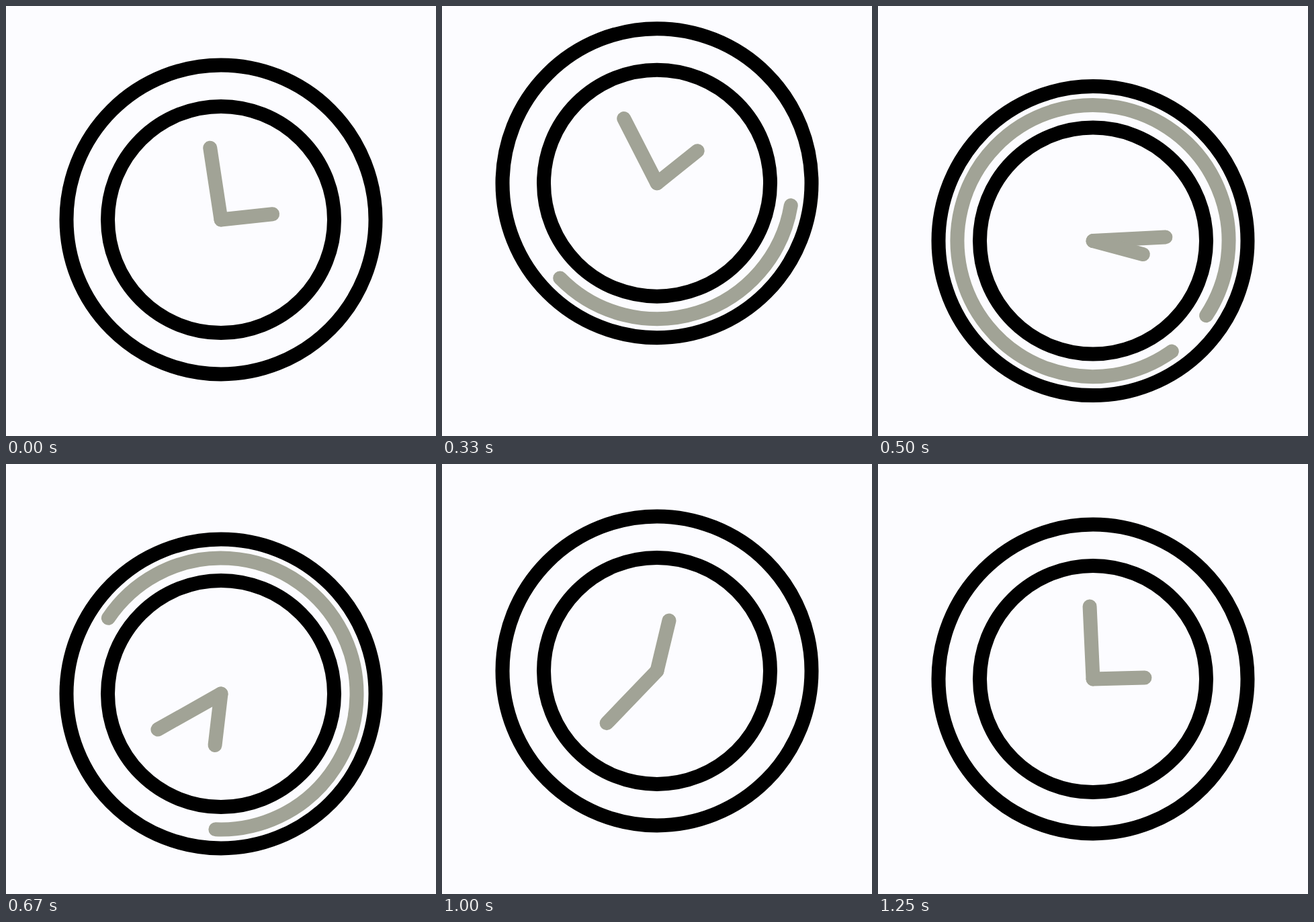
Recreate the animation shown at these times as an HTML page. Size 640 px wide and 640 px high, loop 1.33 s.

```html
<!DOCTYPE html>
<html lang="en">
<head>
<meta charset="utf-8">
<title>Bouncing clock</title>
<style>
  html, body { margin: 0; width: 100%; height: 100%; overflow: hidden; background: #fcfcff; }
  svg { display: block; width: 100%; height: 100%; }
  .line { fill: none; stroke-width: 21; stroke-linecap: round; }
  .ring { stroke: #000; }
  .accent { stroke: #a1a396; }
</style>
</head>
<body>
<svg viewBox="0 0 640 640">
  <g id="clock">
    <circle class="line ring" r="230"/>
    <circle class="line ring" r="168.5"/>
    <path class="line accent" id="sweep"/>
    <path class="line accent" id="minute" d="M0 0V-108"/>
    <path class="line accent" id="hour" d="M0 0H77"/>
  </g>
</svg>
<script>
const LOOP = 1330, FPS = 12, RADIUS = 202;
const el = id => document.getElementById(id);
const clock = el('clock'), sweep = el('sweep'), minute = el('minute'), hour = el('hour');

// Eased curve through [step, value] keys: it rests at turning points and at both ends.
function ease(...keys) {
  const last = keys.length - 1;
  const slope = i => {
    if (i === 0 || i === last) return 0;
    const [a, k, b] = keys.slice(i - 1, i + 2);
    const turns = (k[1] - a[1]) * (b[1] - k[1]) <= 0;
    return turns ? 0 : (b[1] - a[1]) / (b[0] - a[0]);
  };
  return s => {
    if (s <= keys[0][0]) return keys[0][1];
    if (s >= keys[last][0]) return keys[last][1];
    const i = keys.findIndex(k => k[0] > s) - 1;
    const [s0, v0] = keys[i], [s1, v1] = keys[i + 1];
    const h = s1 - s0, u = (s - s0) / h, w = 1 - u;
    return v0 * w * w * (1 + 2 * u) + v1 * u * u * (3 - 2 * u)
      + h * u * w * (slope(i) * w - slope(i + 1) * u);
  };
}

// Two damped hops: up, down, up, rest.
const centreY = ease([-0.5, 320], [3.9, 263.3], [6.65, 363.8], [10.3, 293.3], [13.5, 320]);

// The hands wind back, then the minute hand turns twice and the hour hand once.
const minuteTurn = ease([-1, 0], [2.9, -53], [6, 87], [8, 240.6], [10, 382.3], [12, 583.9], [15.4, 720]);
const hourTurn = ease([-1, 0], [3.3, -44.5], [6, 15], [8, 96.7], [10, 172.5], [12, 283.5], [15.4, 360]);

// Sweep ends, in degrees clockwise from twelve o'clock.
const head = ease([2, 90], [4, 225.6], [6, 483.4], [8, 542.3], [11.9, 574]);
const tail = ease([2, 90], [6, 144.5], [8, 303.9], [11.9, 574]);

function point(deg) {
  const a = deg * Math.PI / 180;
  return (RADIUS * Math.sin(a)).toFixed(2) + ' ' + (-RADIUS * Math.cos(a)).toFixed(2);
}

function arc(from, to) {
  if (to - from < 1) return '';
  const big = to - from > 180 ? 1 : 0;
  return `M${point(from)}A${RADIUS} ${RADIUS} 0 ${big} 1 ${point(to)}`;
}

function draw(ms) {
  // Poses change twelve times a second, on ten-millisecond ticks.
  const tick = Math.floor(ms % LOOP / 10) * 10;
  const step = Math.floor((tick + 3.4) * FPS / 1000);
  clock.setAttribute('transform', `translate(320 ${centreY(step)})`);
  minute.setAttribute('transform', `rotate(${minuteTurn(step)})`);
  hour.setAttribute('transform', `rotate(${hourTurn(step)})`);
  sweep.setAttribute('d', arc(tail(step), head(step)));
}

const start = performance.now();
function frame() {
  draw(performance.now() - start);
  requestAnimationFrame(frame);
}
frame();
</script>
</body>
</html>
```
